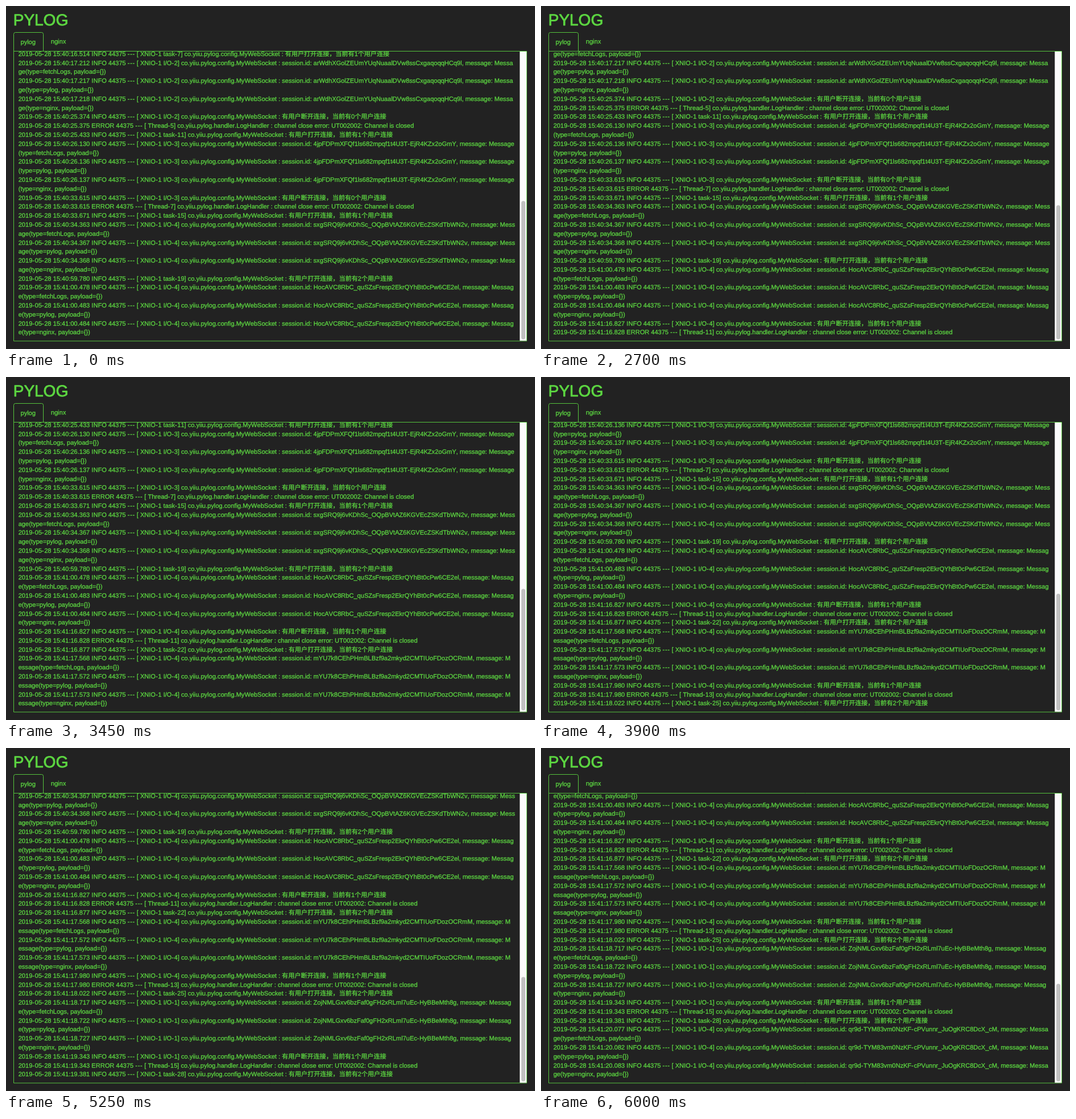
These frames come from a looping animation (928x603 px, 7.15 s). An HTML page with a canvas:

```html
<!DOCTYPE html>
<html lang="zh-CN">
<head>
<meta charset="utf-8">
<title>PYLOG</title>
<style>
html, body { margin: 0; width: 100%; height: 100%; overflow: hidden; background: #222; }
canvas { display: block; }
</style>
</head>
<body>
<canvas id="stage" width="928" height="603"></canvas>
<script>
const ctx = document.getElementById('stage').getContext('2d');
const LOOP = 7150;
const GREEN = '#5cd641', BACK = '#222222';
const FAMILY = '"Liberation Sans", "Noto Sans CJK SC", "Noto Sans CJK", sans-serif';
const TEXT_SIZE = 11.05, HYPHEN_SPACE = 0.056 * TEXT_SIZE;
const LINE_HEIGHT = 15.79, LAST_BASELINE = 577.4, VISIBLE_ROWS = 32;

// Log text
const rows = [];

function entry(time, level, thread, source, text) {
  return `2019-05-28 15:${time} ${level} 44375 --- [ ${thread}] co.yiiu.pylog.${source} : ${text}`;
}
function socket(time, thread, text) {
  return entry(time, 'INFO', 'XNIO-1 ' + thread, 'config.MyWebSocket', text);
}
function opened(time, task, users) {
  rows.push(socket(time, 'task-' + task, `有用户打开连接，当前有${users}个用户连接`));
}
function closed(time, io, users, errorTime, thread) {
  rows.push(socket(time, 'I/O-' + io, `有用户断开连接，当前有${users}个用户连接`));
  rows.push(entry(errorTime, 'ERROR', 'Thread-' + thread, 'handler.LogHandler',
    'channel close error: UT002002: Channel is closed'));
}
// Each message wraps after the given number of letters of "Message".
function messages(times, io, id, wrap) {
  ['fetchLogs', 'pylog', 'nginx'].forEach((type, i) => {
    rows.push(socket(times[i], 'I/O-' + io, `session.id: ${id}, message: ` + 'Message'.slice(0, wrap)));
    rows.push('Message'.slice(wrap) + `(type=${type}, payload={})`);
  });
}

opened('40:16.514', 7, 1);
messages(['40:17.212', '40:17.217', '40:17.218'], 2, 'arWdhXGolZEUmYUqNuaalDVw8ssCxgaqoqqHCq9l', 5);
closed('40:25.374', 2, 0, '40:25.375', 5);
opened('40:25.433', 11, 1);
messages(['40:26.130', '40:26.136', '40:26.137'], 3, '4jpFDPmXFQf1ls682mpqf1t4U3T-EjR4KZx2oGmY', 7);
closed('40:33.615', 3, 0, '40:33.615', 7);
opened('40:33.671', 15, 1);
messages(['40:34.363', '40:34.367', '40:34.368'], 4, 'sxgSRQ9j6vKDhSc_OQpBVtAZ6KGVEcZSKdTbWN2v', 4);
opened('40:59.780', 19, 2);
messages(['41:00.478', '41:00.483', '41:00.484'], 4, 'HocAVC8RbC_quSZsFresp2EkrQYhBt0cPw6CE2el', 6);
closed('41:16.827', 4, 1, '41:16.828', 11);
opened('41:16.877', 22, 2);
messages(['41:17.568', '41:17.572', '41:17.573'], 4, 'mYU7k8CEhPHmBLBzf9a2mkyd2CMTIUoFDozOCRmM', 1);
closed('41:17.980', 4, 1, '41:17.980', 13);
opened('41:18.022', 25, 2);
messages(['41:18.717', '41:18.722', '41:18.727'], 1, 'ZojNMLGxv6bzFaf0gFH2xRLml7uEc-HyBBeMth8g', 6);
closed('41:19.343', 1, 1, '41:19.343', 15);
opened('41:19.381', 28, 2);
messages(['41:20.077', '41:20.082', '41:20.083'], 4, 'qr9d-TYM83vm0NzKF-cPVunnr_JuOgKRC8DcX_cM', 5);

// Start time and number of rows logged so far
const arrivals = [[0, 32], [2700, 34], [2850, 35], [3450, 41], [3900, 44], [4650, 50], [5250, 53], [6000, 59]];
// Start time and pointer position; no position means hidden
const pointer = [[0], [750, 355, 553], [900, 362, 530], [1200, 359, 525], [1500],
  [5700, 193, 583], [5850, 256, 589], [6000]];

const current = (steps, t) => steps.filter(step => step[0] <= t).pop();

// Fill plus a thin outline, for a slightly heavier weight
function label(text, x, y, size = TEXT_SIZE, weight = 0.3) {
  ctx.font = `${size}px ${FAMILY}`;
  ctx.lineWidth = weight;
  ctx.fillText(text, x, y);
  ctx.strokeText(text, x, y);
}

// Hyphens take a little more room than the font gives them.
function logLine(text, x, y) {
  for (const part of text.split(/(?<=-)/)) {
    label(part, x, y);
    x += ctx.measureText(part).width + HYPHEN_SPACE;
  }
}

function drawHeader() {
  label('PYLOG', 12.7, 34, 28, 0.9);
  label('pylog', 25.5, 66.8);
  label('nginx', 78.8, 66);
  ctx.lineWidth = 0.9;
  ctx.beginPath();
  ctx.moveTo(13.5, 79.5);
  ctx.arcTo(13.5, 46.5, 20, 46.5, 3);
  ctx.arcTo(65.5, 46.5, 65.5, 60, 3);
  ctx.lineTo(65.5, 79.5);
  ctx.stroke();
}

function drawLog(count) {
  ctx.save();
  ctx.beginPath();
  ctx.rect(14, 80, 887, 509);
  ctx.clip();
  const first = count - VISIBLE_ROWS;
  for (let i = first; i < count; i++) {
    logLine(rows[i], 21.7, LAST_BASELINE - (count - 1 - i) * LINE_HEIGHT);
  }
  ctx.restore();
}

function drawPanel(count) {
  ctx.lineWidth = 0.9;
  ctx.strokeRect(13.5, 79.5, 900, 509.5);
  ctx.fillStyle = '#fafafa';
  ctx.fillRect(901.3, 80, 11.8, 508.5);
  const thumb = 248500 / (1022 + (count - VISIBLE_ROWS) * LINE_HEIGHT);
  ctx.fillStyle = '#c1c1c1';
  ctx.beginPath();
  ctx.roundRect(904, 586 - thumb, 7, thumb, 3.5);
  ctx.fill();
}

function drawPointer(x, y) {
  ctx.save();
  ctx.translate(x, y);
  ctx.beginPath();
  [[0.7, 1], [0.7, 11], [3, 9], [4.5, 13], [6.2, 12.3], [4.7, 8.5], [8, 8.3]]
    .forEach(point => ctx.lineTo(...point));
  ctx.closePath();
  ctx.fillStyle = '#000';
  ctx.strokeStyle = '#fff';
  ctx.lineWidth = 0.8;
  ctx.fill();
  ctx.stroke();
  ctx.restore();
}

function draw(now) {
  const t = now % LOOP;
  const count = current(arrivals, t)[1];
  const [, x, y] = current(pointer, t);
  ctx.fillStyle = BACK;
  ctx.fillRect(0, 0, 928, 603);
  ctx.fillStyle = ctx.strokeStyle = GREEN;
  drawHeader();
  drawLog(count);
  drawPanel(count);
  if (x !== undefined) drawPointer(x, y);
}

ctx.fontKerning = 'none';
ctx.textRendering = 'geometricPrecision';
ctx.lineJoin = 'round';
const start = performance.now();
function tick() {
  draw(performance.now() - start);
  requestAnimationFrame(tick);
}
tick();
</script>
</body>
</html>
```
